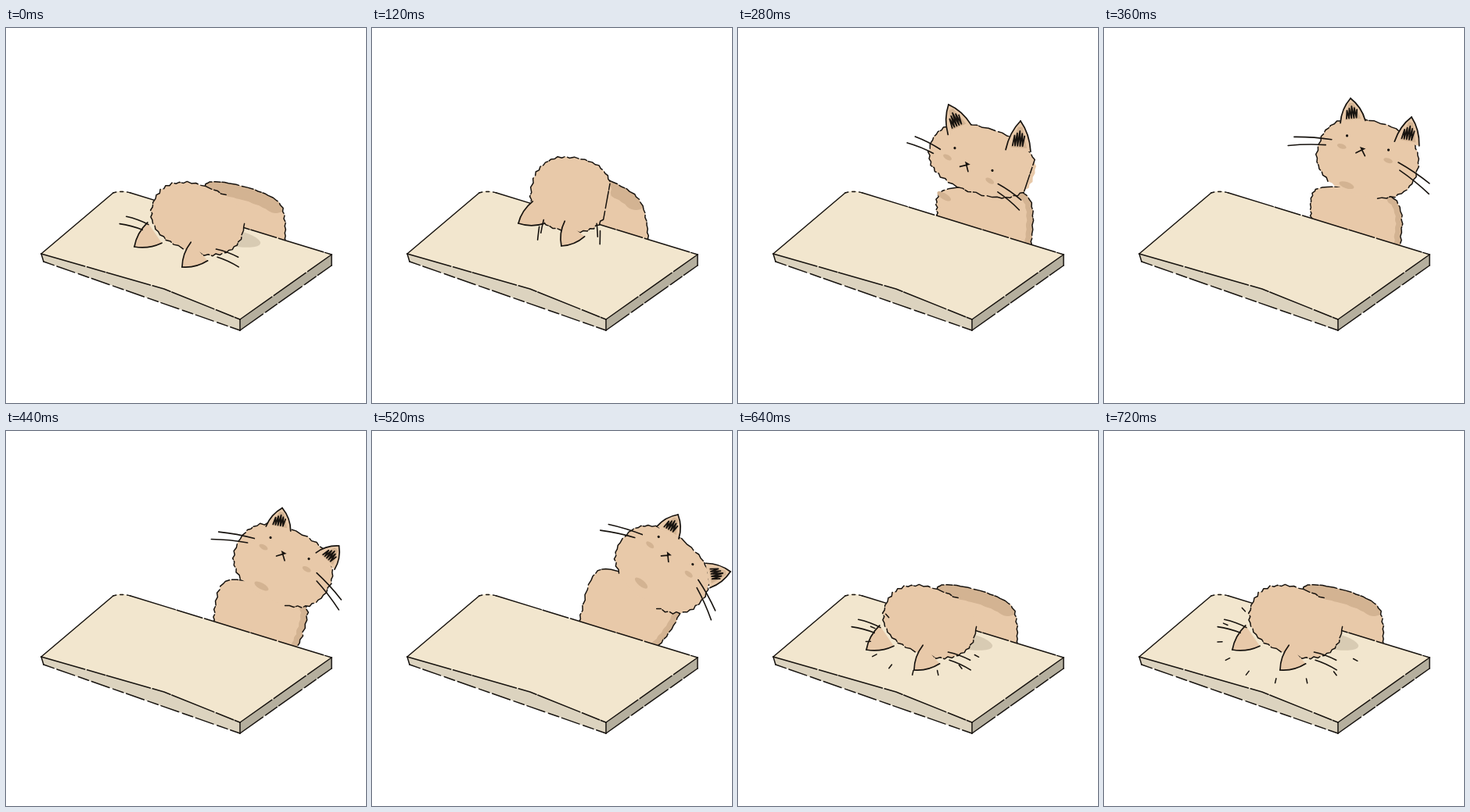
Animation, 460 px wide and 480 px high, one loop 760 ms. Source, as an HTML page with a canvas:

```html
<!DOCTYPE html>
<html>
<head>
<meta charset="utf-8">
<style>
html, body { margin: 0; width: 100%; height: 100%; overflow: hidden; background: #fff; }
canvas { display: block; }
</style>
</head>
<body>
<canvas id="stage" width="460" height="480"></canvas>
<script>
const ctx = document.getElementById('stage').getContext('2d');
const INK = '#17130f', FUR = '#e8c9a9', SHADE = '#d3b392';
const STEP = 40, STEPS = 19, IMPACT = 16;

// body: left base, two shoulders, right base; head: centre, radii, tilt;
// ears: base centre, tip; face: centre, tilt; whiskers: start, length, sag. Angles in degrees.
const poses = [
  { at: 0, body: [262,255, 258,198, 345,220, 357,275], head: [245,244, 60,42, 20],
    earL: [190,262, 164,280], earR: [247,286, 225,306], face: [229,257, 20], whiskers: [46, 30, 0] },
  { at: 3, body: [245,245, 262,186, 338,216, 354,275], head: [254,213, 51,47, 10],
    earL: [213,236, 187,250], earR: [259,257, 242,279], face: [254,237, 4], whiskers: [34, 17, 82] },
  { at: 7, body: [255,246, 265,207, 366,212, 375,280], head: [312,170, 69,42, 18],
    earL: [283,130, 269,98], earR: [358,157, 361,119], face: [301,168, 31], whiskers: [43, 36, 4] },
  { at: 9, body: [265,248, 275,205, 370,218, 379,282], head: [337,167, 65,48, 15],
    earL: [318,120, 315,90], earR: [387,148, 393,114], face: [337,147, 19], whiskers: [45, 48, 15] },
  { at: 13, body: [264,248, 294,177, 390,222, 363,280], head: [371,177, 64,45, 38],
    earL: [378,130, 391,107], earR: [429,185, 458,180], face: [388,153, 39], whiskers: [46, 45, 22] },
  { at: 15, body: [276,250, 280,228, 378,218, 386,280], head: [300,187, 81,41, -6],
    earL: [243,172, 233,146], earR: [333,150, 322,128], face: [284,194, -6], whiskers: [68, 30, -20] }
];

const rad = deg => deg * Math.PI / 180;
const noise = n => { const v = Math.sin(n * 12.9898) * 43758.5453; return v - Math.floor(v); };

// Maps local coordinates to the stage.
const frameAt = (x, y, tilt) => {
  const c = Math.cos(rad(tilt)), s = Math.sin(rad(tilt));
  return (u, v) => [x + u * c - v * s, y + u * s + v * c];
};

function trace(points, closed) {
  ctx.beginPath();
  points.forEach(p => ctx.lineTo(...p));
  if (closed) ctx.closePath();
}

function curve(a, bend, b) {
  ctx.beginPath();
  ctx.moveTo(...a);
  ctx.quadraticCurveTo(...bend, ...b);
}

function ink(width = 1.5, dash = [], color = INK) {
  ctx.strokeStyle = color;
  ctx.lineWidth = width;
  ctx.setLineDash(dash);
  ctx.stroke();
  ctx.setLineDash([]);
}

function fill(color) {
  ctx.fillStyle = color;
  ctx.fill();
}

function blob([x, y], rx, ry, tilt, color) {
  ctx.beginPath();
  ctx.ellipse(x, y, rx, ry, rad(tilt), 0, 7);
  fill(color);
}

// Offset of one fur sample: alternating in and out, with random strength.
const tuftAt = (i, seed, size) => size * (i % 2 ? 1 : -0.7) * (0.2 + noise(i + seed * 7));
const furDash = [15, 3, 8, 2, 22, 4];

function drawTable() {
  const left = [45,289], back = [137,211], bend = [147,208], backRight = [159,211],
    right = [416,290], front = [299,373], crease = [202,334];
  const down = ([x, y]) => [x, y + 14];
  const lowLeft = [48,299];
  trace([left, back, bend, backRight, right, front, crease], true);
  fill('#f2e6ce');
  trace([left, crease, front, down(front), lowLeft], true);
  fill('#dcd3bf');
  trace([front, right, down(right), down(front)], true);
  fill('#b5af9e');

  trace([left, back]);
  ink();
  curve(back, bend, backRight);
  ink(1.5, [4, 5]);
  trace([backRight, right]);
  ink(1.5, [60, 2, 34, 3]);
  trace([left, crease, front]);
  ink(1.6, [58, 3, 24, 2]);
  trace([lowLeft, down(front)]);
  ink(1.5, [14, 4, 24, 5]);
  trace([front, right]);
  ink(1.5, [50, 3]);
  trace([down(front), down(right)]);
  ink(1.5, [36, 4, 18, 3]);
  for (const corner of [front, right]) { trace([corner, down(corner)]); ink(); }
  trace([left, lowLeft]);
  ink();
}

function drawBody(b, seed, tuft, faceUp) {
  const keys = [0, 0, 2, 4, 6, 6].map(i => [b[i], b[i + 1]]);
  const parts = [0, 1, 2].map(s => Array.from({ length: 15 }, (_, k) => {
    const t = k / 14, [p, q, r, w] = keys.slice(s, s + 4);
    const [x, y] = [0, 1].map(j => q[j] + t / 2 * (r[j] - p[j] + t * (2 * p[j] - 5 * q[j] + 4 * r[j] - w[j]
      + t * (3 * (q[j] - r[j]) + w[j] - p[j]))));
    return [x + tuftAt(s * 14 + k, seed, tuft) * (x > (b[0] + b[6]) / 2 ? 1 : -1), y];
  }));
  const outline = parts.flat();
  trace(outline, true);
  fill(FUR);
  ctx.save();
  ctx.clip();
  trace(parts[faceUp ? 2 : 1]);
  ink(faceUp ? 16 : 34, [], SHADE);
  ctx.restore();
  trace(outline);
  ink(1.5, furDash);
}

function drawHead([x, y, rx, ry, tilt], u, tuft) {
  const place = frameAt(x, y, tilt), samples = 66;
  const round = v => Math.sign(v) * Math.abs(v) ** 0.85;
  const outline = Array.from({ length: samples }, (_, i) => {
    const a = i / samples * 2 * Math.PI, push = tuftAt(i, u, tuft);
    return place((rx + push) * round(Math.cos(a)), (ry + push) * round(Math.sin(a)));
  });
  trace(outline, true);
  fill(FUR);
  // The line opens where head and body merge: at the back when slumped, at the chin when upright.
  const gap = u < 0.5 ? 58 : u > 2.5 ? 18 : samples;
  trace(Array.from({ length: samples - 9 }, (_, i) => outline[(gap + 5 + i) % samples]), gap === samples);
  ink(1.5, furDash);
}

function drawEar([x, y, tipX, tipY], inside) {
  const tip = [tipX, tipY], length = Math.hypot(tipX - x, tipY - y);
  const side = [(y - tipY) / length, (tipX - x) / length];
  const place = (u, v) => [x + (tipX - x) * v + side[0] * 32 * u, y + (tipY - y) * v + side[1] * 32 * u];
  ctx.beginPath();
  ctx.moveTo(...place(-.5, 0));
  ctx.quadraticCurveTo(...place(-.4, .6), ...tip);
  ctx.quadraticCurveTo(...place(.4, .6), ...place(.5, 0));
  fill(FUR);
  if (inside) {
    trace([place(-.3, .1), place(-.08, .8), place(.1, .8), place(.34, .1)], true);
    fill(SHADE);
  }
  curve(place(-.5, 0), place(-.4, .6), tip);
  ink(1.7);
  curve(tip, place(.4, .6), place(.5, 0));
  ink(1.7);
  if (!inside) return;
  trace(Array.from({ length: 10 }, (_, i) => place(-.24 + i * .05, i % 2 ? .66 - Math.abs(i - 5) * .04 : .16)));
  ink(1.8);
}

function drawFace(place, tilt, droop) {
  blob(place(-30, 15), 6, 3, tilt, SHADE);
  blob(place(32, 13), 6, 3, tilt, SHADE);
  for (const side of [-28, 28]) {
    trace([place(side - 3 * droop, -2 * droop), place(side + 3 * droop + .01, 2 * droop)]);
    ink(3.2 - droop);
  }
  const wide = 1 + droop;
  trace([place(-8, 8), place(0, 8), place(-4, 12)], true);
  fill(INK);
  trace([place(-4 - 6 * wide, 17), place(-4, 11), place(-4 + 6 * wide, 17)]);
  ink(1.7);
}

function drawWhiskers(place, [start, length, sag]) {
  for (const side of [-1, 1]) for (const row of [0, 1]) {
    const angle = rad(sag + row * 5), from = [start + row * 5, 11 + row * 9];
    const along = (d, lift) => place(side * (from[0] + d * Math.cos(angle)), from[1] + d * Math.sin(angle) - lift);
    curve(along(0, 0), along(length / 2, 2), along(length, 0));
    ink(1.6);
  }
}

function drawMarks(spread) {
  for (let i = 0; i < 9; i++) {
    const a = rad(28 + i * 25);
    const point = d => [240 + (92 * spread + d) * Math.cos(a), 268 + (53 * spread + d) * Math.sin(a)];
    trace([point(-3), point(3)]);
    ink();
  }
}

function drawCat(u) {
  const low = Math.min(Math.floor(u), poses.length - 2), from = poses[low], to = poses[low + 1];
  const blend = key => from[key].map((v, i) => v + (to[key][i] - v) * (u - low));
  const faceUp = u >= 1.5, droop = Math.max(0, u - 4), tuft = 1.4 + droop * 1.6;
  const face = blend('face'), place = frameAt(...face);

  drawBody(blend('body'), u + 3, tuft, faceUp);
  drawTable();
  if (u < 0.4 || u > 4.6) blob([284, 267], 42, 11, 12, '#d8cbb3');
  drawHead(blend('head'), u, tuft);
  if (faceUp && !droop) blob(place(-8, 60), 10, 4, face[2], SHADE);
  drawEar(blend('earL'), faceUp);
  drawEar(blend('earR'), faceUp);
  if (faceUp) drawFace(place, face[2], droop);
  drawWhiskers(place, blend('whiskers'));
}

// Position along the pose list; the last move, the fall, accelerates.
function poseAt(step) {
  if (step >= IMPACT) return 0;
  const fall = poses.length - 2;
  const i = Math.min(fall, poses.filter(p => p.at <= step).length - 1);
  const k = (step - poses[i].at) / (poses[i + 1].at - poses[i].at);
  return i + (i === fall ? k * k : k);
}

function frame() {
  const step = Math.floor(performance.now() / STEP) % STEPS;
  ctx.clearRect(0, 0, 460, 480);
  ctx.lineCap = ctx.lineJoin = 'round';
  drawCat(poseAt(step));
  if (step >= IMPACT) drawMarks(0.8 + (step - IMPACT) * 0.1);
  requestAnimationFrame(frame);
}
frame();
</script>
</body>
</html>
```
